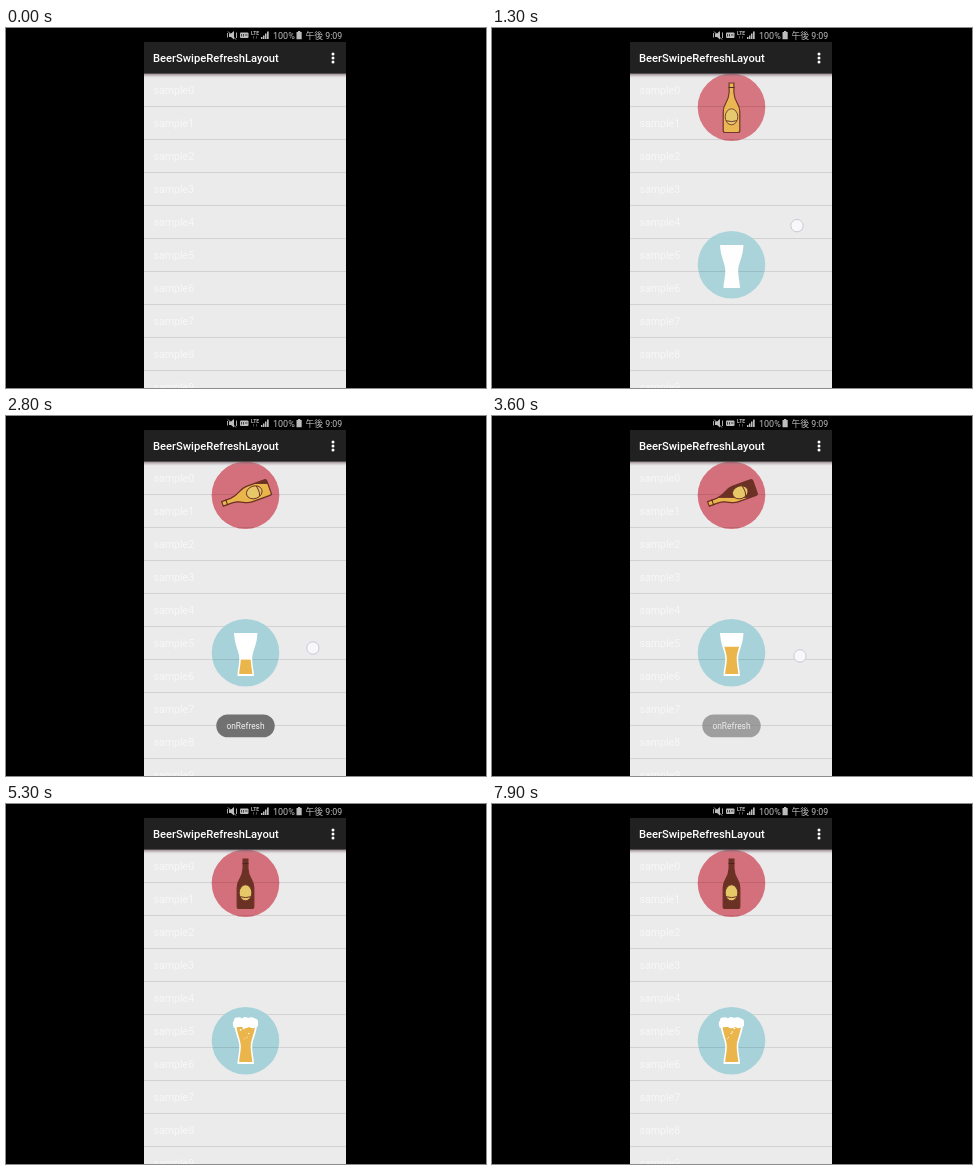
An HTML page for the animation above (8000 ms loop, 480 by 360 pixels).

```html
<!DOCTYPE html>
<html lang="en">
<head>
<meta charset="utf-8">
<title>Pull to refresh</title>
<style>
html, body { margin: 0; width: 100%; height: 100%; overflow: hidden; background: #000; }
svg { display: block; width: 100%; height: 100%; font-family: Roboto, "Noto Sans CJK JP", "Noto Sans CJK", sans-serif; }
</style>
</head>
<body>
<svg viewBox="0 0 480 360">
  <defs>
    <linearGradient id="shadow" x2="0" y2="1">
      <stop offset="0" stop-color="#58434d" stop-opacity=".75"/>
      <stop offset="1" stop-color="#b8a0aa" stop-opacity="0"/>
    </linearGradient>
    <path id="bottleShape" d="M-2.4-24.5H2.4V-15C2.8-5 8.3-4 8.3 4V23Q8.3 25 6.3 25H-6.3Q-8.3 25-8.3 23V4C-8.3-4-2.8-5-2.4-15Z"/>
    <clipPath id="bottleClip"><use href="#bottleShape"/></clipPath>
    <clipPath id="glassClip">
      <path d="M229.8 217H249.7C249 229 244.7 236 244.7 242C244.7 249 246 252 246.3 258H233.2C233.5 252 234.8 249 234.8 242C234.8 236 230.5 229 229.8 217Z"/>
    </clipPath>
    <clipPath id="screen"><rect x="138" y="45" width="202" height="315"/></clipPath>
  </defs>
  <rect width="480" height="360"/>

  <g clip-path="url(#screen)">
    <rect x="138" y="45" width="202" height="315" fill="#ebebeb"/>
    <g id="list" font-size="10.6" fill="#f7f7f7"></g>

    <g id="discs">
      <circle cx="239.5" cy="79.3" r="33.8" fill="#d46c77" fill-opacity=".96"/>
      <circle cx="239.5" cy="236.7" r="33.8" fill="#a5d2d9" fill-opacity=".96"/>
      <path d="M206 78.5H273M231 111.5H248M207 243.5H272" stroke="#000" stroke-opacity=".1"/>

      <g id="bottle">
        <use href="#bottleShape" fill="#6b3125"/>
        <g clip-path="url(#bottleClip)">
          <rect id="bottleBeer" x="-40" width="80" height="80" fill="#eab54b"/>
        </g>
        <use href="#bottleShape" fill="none" stroke="#6b3125" stroke-width="1.2"/>
        <path d="M-2.9-20H2.9" stroke="#4d241c"/>
        <ellipse cy="9.3" rx="6.3" ry="8" fill="#e6c868" stroke="#6b3125" stroke-width=".9"/>
        <path d="M-5.3 13.2Q0 15 5.3 13.2" fill="none" stroke="#6b3125"/>
      </g>

      <path d="M228 217H251.5C251 229 246.2 236 246.2 242C246.2 250 247.8 253 248 260H231.5C231.7 253 233.3 250 233.3 242C233.3 236 228.5 229 228 217Z" fill="#fff"/>
      <g clip-path="url(#glassClip)">
        <rect id="glassBeer" x="225" width="30" height="50" fill="#eab54b"/>
        <g id="bubbles" fill="#fff"></g>
      </g>
      <path id="foam" d="M228 224Q225.5 219 228 216.5Q228 213 231.5 213.5Q234 212.5 236 214.5Q239 212 242 214Q246 212.5 249 214.5Q252.5 215 252 219Q253 223 249 223.5Q246 225 243 223Q239 225.5 236 223Q232 222.5 228 224Z" fill="#fff"/>
    </g>

    <g id="toast">
      <rect x="210.3" y="298.5" width="58.4" height="22.8" rx="11.4" fill="#717171"/>
      <text x="239.5" y="313" font-size="8.4" text-anchor="middle" fill="#f2f2f2">onRefresh</text>
    </g>
    <rect x="138" y="45" width="202" height="5" fill="url(#shadow)"/>
    <circle id="touch" r="6.2" fill="#f8f8fb" stroke="#c9c9d6"/>
  </g>

  <rect x="138" y="14" width="202" height="31.5" fill="#212121"/>
  <text x="147" y="34" font-size="11.2" font-weight="500" fill="#fff">BeerSwipeRefreshLayout</text>
  <g fill="#fff">
    <circle cx="327" cy="26" r="1.5"/><circle cx="327" cy="30" r="1.5"/><circle cx="327" cy="34" r="1.5"/>
  </g>

  <g fill="#bdbdbd">
    <path d="M223 5.5H225L228 3V11.5L225 9H223Z"/>
    <path d="M222 3.5L230 11.5M230.5 4.5V10M221.5 5V9.5" stroke="#bdbdbd" stroke-width=".9"/>
    <rect x="234" y="4.5" width="8.5" height="5.5" rx="1"/>
    <path d="M235.5 6V8.5M237.5 6V8.5M239 7H241.5" stroke="#222" stroke-width=".8"/>
    <text x="245" y="6.8" font-size="5" font-weight="700">LTE</text>
    <path d="M247.5 8V10.5M250.5 8V10.5" stroke="#666" stroke-width=".8"/>
    <path d="M255 11V9H256.5V11ZM257 11V7.5H258.5V11ZM259 11V5.5H260.5V11ZM261 11V3.5H262.7V11Z"/>
    <text x="267" y="10.5" font-size="9">100%</text>
    <path d="M290.5 4H292V3H294.3V4H295.7V11.2H290.5Z"/>
    <text x="299.5" y="10.5" font-size="8.8">午後 9:09</text>
  </g>
</svg>
<script>
const LOOP = 8000;
const el = id => document.getElementById(id);
const set = (id, attrs) => { for (const k in attrs) el(id).setAttribute(k, attrs[k]); };
const mix = (a, b, p) => a + (b - a) * p;
const span = (t, from, to) => Math.min(1, Math.max(0, (t - from) / (to - from)));
const ease = p => (1 - Math.cos(Math.PI * p)) / 2;

el('list').innerHTML = Array.from({ length: 10 }, (_, i) => {
  const y = 45.5 + i * 33;
  return `<text x="147.5" y="${y + 20.8}">sample${i}</text>
    <path d="M138 ${y + 33}H340" stroke="#d2d2d2"/>`;
}).join('');

const BUBBLES = 5;
el('bubbles').innerHTML = '<circle/>'.repeat(BUBBLES);

// Finger height as [time, y] pairs
const drag = [[500, 94], [900, 154], [1350, 203], [1800, 222], [3600, 240], [4800, 242]];
function fingerY(t) {
  let i = 1;
  while (i < drag.length - 1 && t > drag[i][0]) i++;
  const [t0, y0] = drag[i - 1], [t1, y1] = drag[i];
  return mix(y0, y1, span(t, t0, t1));
}

function draw(t) {
  const y = fingerY(t);
  set('touch', {
    cx: mix(305, 308, span(t, 1800, 3400)), cy: y,
    opacity: t < 500 ? 0 : 1 - span(t, 4650, 4900)
  });
  set('discs', { opacity: t < 500 ? 0 : span(y, 85, 203) });
  set('toast', { opacity: span(t, 1400, 1700) * (1 - span(t, 3450, 3850)) });

  const pour = span(t, 1900, 4150);
  const angle = -110 * (ease(span(t, 1350, 1800)) - ease(span(t, 4200, 5150)));
  const level = pour === 0 ? -40 : pour === 1 ? 40 : mix(-17, 17, pour ** 2);
  set('bottle', { transform: `translate(239.5 79.5) rotate(${angle})` });
  set('bottleBeer', { y: level, transform: `rotate(${-angle})` });
  set('glassBeer', { y: mix(258, 222, pour) });

  const foam = ease(span(t, 4050, 4400));
  const sway = Math.sin(t / 420) * .4;
  set('foam', {
    opacity: foam,
    transform: `translate(${sway} ${mix(5, 0, foam)})`
  });
  [...el('bubbles').children].forEach((dot, i) => {
    const rise = (t / 1900 + i * .37) % 1;
    dot.setAttribute('cx', 235 + (i * 3.7) % 9 + Math.sin(t / 300 + i) * .5);
    dot.setAttribute('cy', mix(237, 223, rise));
    dot.setAttribute('r', foam * mix(.4, 1, rise));
  });
}

function tick() {
  draw(performance.now() % LOOP);
  requestAnimationFrame(tick);
}
tick();
</script>
</body>
</html>
```
